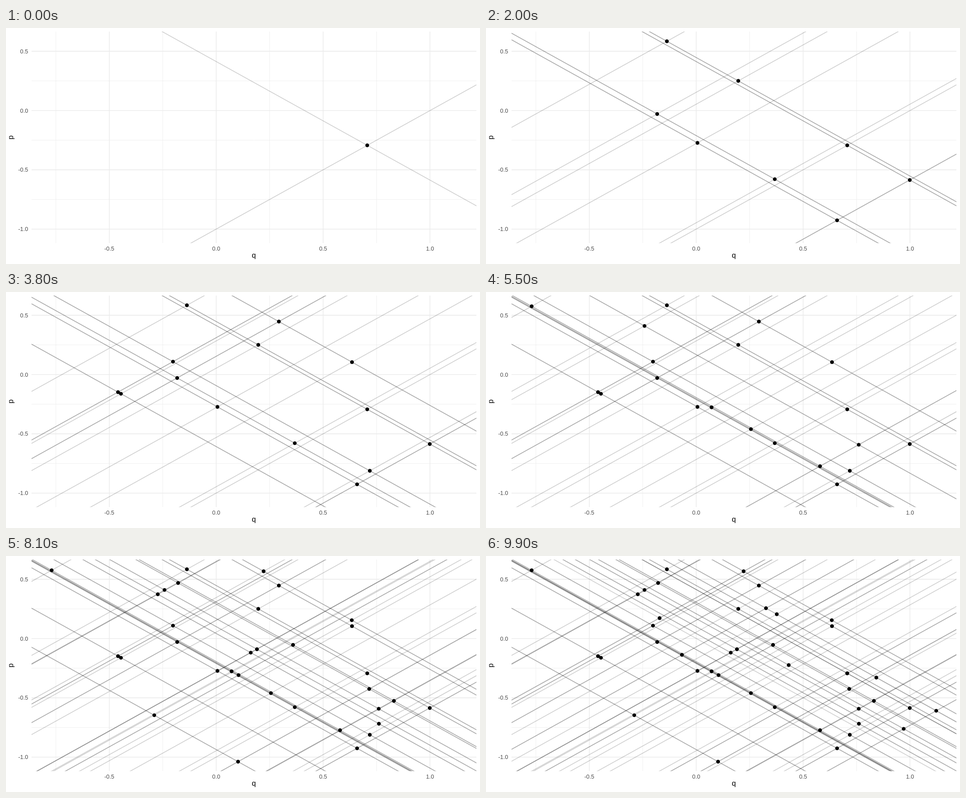
Animation, 1058 px wide and 529 px high, one loop 10000 ms. Source, as an HTML page with a canvas:

```html
<!DOCTYPE html>
<html lang="en">
<head>
<meta charset="utf-8">
<title>Phase plane walk</title>
<style>
  html, body { margin: 0; width: 100%; height: 100%; overflow: hidden; background: #fff; }
  canvas { display: block; width: 1058px; height: 529px; }
</style>
</head>
<body>
<canvas id="stage" width="1058" height="529"></canvas>
<script>
const ctx = document.getElementById("stage").getContext("2d");
const LOOP = 10000;
const FONT = '"Liberation Sans", Arial, sans-serif';
const panel = { left: 57, top: 8, right: 1050, bottom: 482.3 };

const toX = q => 469.2 + 477.15 * q;
const toY = p => 185 - 265.75 * p;

// Each leg: new u, then a shift of u together with a new v (u = q - p, v = q + p).
const legs = [
  [1.585, 0, -.267], [.2787, -1, .447], [-.0534, 1, -.2115], [-.1537, 0, .74],
  [.5305, 1, -.0935], [-.3108, 0, -.6078], [-.2834, 1, -.2046], [.3484, -1, .168],
  [1.3525, 0, -.194], [-1.3455, 1, .789], [.4795, 1, .0426], [.2806, 0, .1005],
  [-.647, 0, .2905], [1.141, 0, -.9365], [.357, 1, .3056], [.4132, 0, -.2043],
  [.0708, 0, .582], [.1718, 1, .5136], [1.732, 0, .209], [.6564, -1, .001]
];

function buildWalk() {
  let v = .413;
  const walk = [{ u: 1, v }];
  for (const [u, shift, nextV] of legs) {
    walk.push({ u, v });
    v = nextV;
    walk.push({ u: u + shift, v });
  }
  walk.push(walk[0]); // the walk wraps to its start
  return walk;
}
const walk = buildWalk();

function visibleCount(t) {
  if (t < 200) return 1;
  if (t < 5200) return 2 + Math.floor((t - 200) / 300);
  if (t < 5500) return 19;
  return Math.min(walk.length, 20 + Math.floor((t - 5500) / 200));
}

function line(x1, y1, x2, y2) {
  ctx.beginPath();
  ctx.moveTo(x1, y1);
  ctx.lineTo(x2, y2);
  ctx.stroke();
}

function gridLines(qs, ps, width) {
  ctx.lineWidth = width;
  for (const p of ps) line(panel.left, toY(p), panel.right, toY(p));
  for (const q of qs) line(toX(q), panel.top, toX(q), panel.bottom);
}

function drawLabels() {
  ctx.fillStyle = "#4d4d4d";
  ctx.font = "12.8px " + FONT;
  ctx.textAlign = "right";
  for (const p of [-1, -.5, 0, .5]) ctx.fillText(p.toFixed(1), 49.3, toY(p) + 4.6);
  ctx.textAlign = "center";
  for (const q of [-.5, 0, .5, 1]) ctx.fillText(q.toFixed(1), toX(q), 499.4);

  ctx.fillStyle = "#000";
  ctx.font = "16px " + FONT;
  ctx.fillText("q", 553.3, 515);
  ctx.save();
  ctx.translate(16, 245.2);
  ctx.rotate(-Math.PI / 2);
  ctx.fillText("p", 0, 0);
  ctx.restore();
}

function draw(t) {
  ctx.fillStyle = "#fff";
  ctx.fillRect(0, 0, 1058, 529);
  const shown = walk.slice(0, visibleCount(t));

  ctx.save();
  ctx.beginPath();
  ctx.rect(panel.left, panel.top, panel.right - panel.left, panel.bottom - panel.top);
  ctx.clip();

  ctx.strokeStyle = "#ebebeb";
  gridLines([-.75, -.25, .25, .75], [-.75, -.25, .25], .78);
  gridLines([-.5, 0, .5, 1], [-1, -.5, 0, .5], 1.55);

  ctx.strokeStyle = "rgba(0,0,0,.2)";
  ctx.lineWidth = 1.55;
  const [x1, x2] = [toX(-1), toX(1.4)];
  for (const { u, v } of shown) {
    line(x1, toY(-1 - u), x2, toY(1.4 - u));
    line(x1, toY(v + 1), x2, toY(v - 1.4));
  }

  ctx.fillStyle = "#000";
  for (const { u, v } of shown) {
    ctx.beginPath();
    ctx.arc(toX((u + v) / 2), toY((v - u) / 2), 4.2, 0, 2 * Math.PI);
    ctx.fill();
  }
  ctx.restore();

  drawLabels();
}

const start = performance.now();
function tick() {
  draw((performance.now() - start) % LOOP);
  requestAnimationFrame(tick);
}
tick();
</script>
</body>
</html>
```
